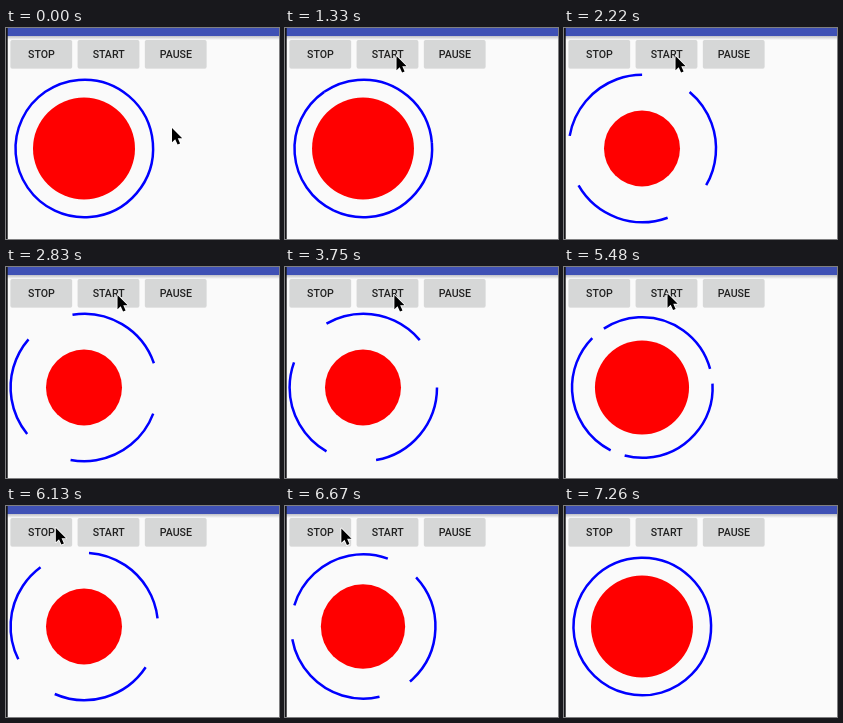
An HTML page that plays this animation: 273x211 px, repeating every 7880 ms.

```html
<!DOCTYPE html>
<html lang="en">
<head>
<meta charset="utf-8">
<title>Stop, start, pause</title>
<style>
  html, body { margin: 0; width: 100%; height: 100%; overflow: hidden; background: #fafafa; }
  svg { display: block; width: 100vw; height: 100vh; }
  text { font: 500 10.6px Roboto, "Liberation Sans", sans-serif; fill: #212121; text-anchor: middle; }
</style>
</head>
<body>
<svg viewBox="0 0 273 211">
  <defs>
    <linearGradient id="shade" x2="0" y2="1">
      <stop offset="0" stop-color="#bfc0c6"/>
      <stop offset="1" stop-color="#fafafa"/>
    </linearGradient>
  </defs>
  <rect width="273" height="211" fill="#fafafa"/>
  <rect y="8" width="273" height="4" fill="url(#shade)"/>
  <rect width="273" height="8" fill="#3f51b5"/>
  <rect width="1.7" height="211" fill="#151518"/>
  <g id="buttons"></g>
  <circle id="disc" cx="78" cy="120.5" fill="#f00"/>
  <circle id="ring" cx="78.3" cy="120.5" fill="none" stroke="#00f" stroke-width="2.5" pathLength="360"/>
  <path id="cursor" d="M0 0V14.2L3.2 11.2L5.6 16.6L8.1 15.5L5.8 10.3H10.2Z"
    fill="#000" stroke="#fff" stroke-width="1.6" stroke-linejoin="round" paint-order="stroke"/>
</svg>
<script>
const LOOP = 7880;
const el = id => document.getElementById(id);
const disc = el('disc'), ring = el('ring'), cursor = el('cursor');

el('buttons').innerHTML = ['STOP', 'START', 'PAUSE'].map((label, i) => {
  const x = 4.5 + 67.2 * i;
  return `<rect x="${x}" y="12.8" width="61.6" height="28.2" rx="1.8" fill="#e6e6e6"/>
    <rect x="${x}" y="12" width="61.6" height="28.2" rx="1.6" fill="#d6d7d7"/>
    <text x="${x + 31}" y="30.4">${label}</text>`;
}).join('');

const clamp = v => Math.min(1, Math.max(0, v));
const span = (t, from, length) => clamp((t - from) / length);
const smooth = u => (1 - Math.cos(Math.PI * u)) / 2;
const speedUp = u => u * u;
const mix = (a, b, u) => a + (b - a) * u;

// Each run: ring opens, spins, then closes when stopped.
const runs = [
  { open: 1315, spin: 2040, stop: 4260 },
  { open: 5280, spin: 6006, stop: 6405 }
];

// Pointer moves: start, end, from, to.
const moves = [
  [10, 610, [166, 100], [111.5, 28]],
  [2900, 3300, [111.5, 28], [109.5, 28]],
  [3740, 4090, [109.5, 28], [59, 24]],
  [4270, 4620, [59, 24], [103.5, 26.5]],
  [5760, 6050, [103.5, 26.5], [49.8, 22]],
  [6500, 6860, [49.8, 22], [64, 23]],
  [6990, 7255, [64, 23], [262, 216]]
];

function drawRing(t) {
  const run = t < 5000 ? runs[0] : runs[1];
  const opened = smooth(span(t, run.open, 540));
  const gap = opened * (1 - speedUp(span(t, run.stop, 471)));
  const turn = 1440 * smooth(span(Math.min(t, run.stop), run.spin, 1280));
  const sweep = 120 - 40 * gap;
  disc.setAttribute('r', mix(51, 38, gap));
  ring.setAttribute('r', mix(68.8, 73.7, gap));
  ring.setAttribute('stroke-dasharray', `${sweep} ${120 - sweep}`);
  ring.setAttribute('transform', `rotate(${turn - 4.6 * (1 - gap)} 78.3 120.5)`);
}

function drawCursor(t) {
  const move = moves.filter(m => m[0] <= t).pop() || moves[0];
  const [from, to, a, b] = move;
  const ease = move === moves[moves.length - 1] ? speedUp : smooth;
  const u = ease(span(t, from, to - from));
  cursor.setAttribute('transform', `translate(${mix(a[0], b[0], u)} ${mix(a[1], b[1], u)})`);
  cursor.setAttribute('visibility', t < 7255 ? 'visible' : 'hidden');
}

function draw(t) {
  drawRing(t);
  drawCursor(t);
}

const began = performance.now();
function tick() {
  draw((performance.now() - began) % LOOP);
  requestAnimationFrame(tick);
}
tick();
</script>
</body>
</html>
```
